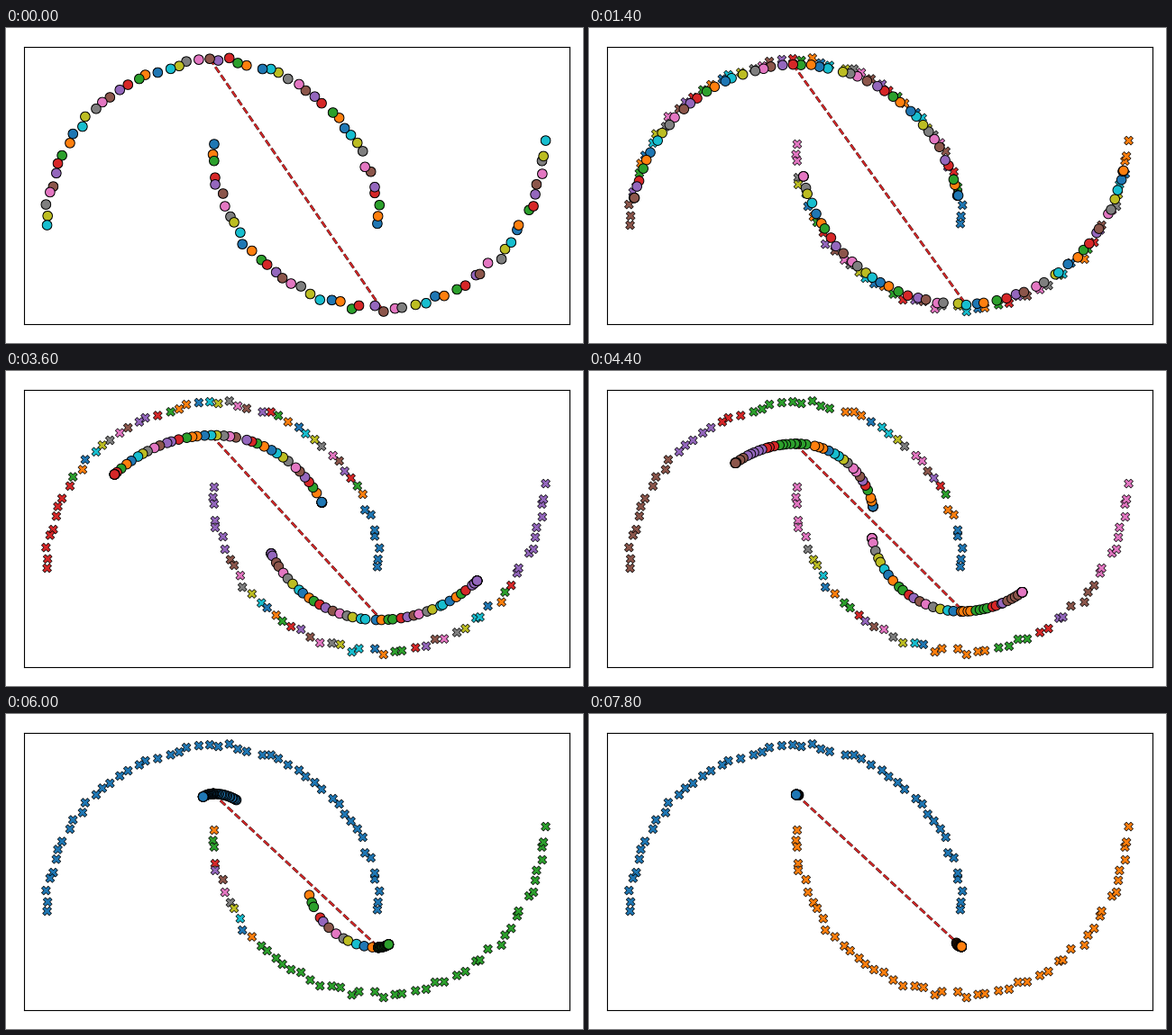
These frames come from a looping animation (640 px wide and 350 px high, 8 s). A matplotlib script:

```python
import numpy as np
import matplotlib.pyplot as plt
from matplotlib.animation import FuncAnimation

plt.rcParams["lines.scale_dashes"] = False
W, H, DPI = 640, 350, 100
STEP, FRAMES = 200, 40
N, R, NOISE = 50, 183.5, 2
TAB = np.array(plt.get_cmap("tab10").colors)
rng = np.random.default_rng(5)


def fade(k, span, power):
    """Ease from 1 down to 0 over about 'span' frames."""
    return np.exp(-(k / span) ** power)


class Moon:
    """Half circle of noisy points whose centres contract to one spot.

    The 'near' end lies beside the other moon and sags towards it,
    the 'far' end slides along the arc to the apex.
    """

    def __init__(self, sign, centre, reach, sag, still):
        self.sign, self.centre = sign, np.array(centre)
        self.reach, self.sag, self.still = reach, sag, still
        a = np.linspace(0, np.pi, N)
        spot = R * np.c_[np.cos(a), -np.sin(a)] + rng.normal(0, NOISE, (N, 2))
        self.data = self.centre + sign * spot
        # +1 at the near end, 0 at the apex, -1 at the far end
        self.lin = np.arctan2(spot[:, 0], -spot[:, 1]) * 2 / np.pi
        self.noise = self.data - self.arc(0)

    def half(self, k, lin, w, h, lo, hi):
        """Points on a circular arc from the apex to (w, h)."""
        f = np.clip((lin - lo) / (hi - lo), 0, 1)
        w, h = max(w, .02), max(h, .001)
        rad, turn = (w * w + h * h) / (2 * h), 2 * np.arctan2(h, w)
        return rad * np.c_[np.sin(f * turn), 1 - np.cos(f * turn)]

    def arc(self, k):
        w = R * self.reach(k)
        slope = np.interp(k, [0, 7, 12, 18, 22, 30],
                          [1, .81, .61, .62, .82, self.sag])
        hi = .6 + .4 * fade(k, 14.5, 2)
        near = self.half(k, self.lin, w, w * slope,
                         np.interp(k, [20, 30], [0, self.still]),
                         hi + np.interp(k, [15, 30], [0, .4]))
        far = self.half(k, -self.lin, R * fade(k, 22, 3.3),
                        R * fade(k, 15, 2), 0, hi) * [-1, 1]
        apex = [0, 53 * (1 - fade(k, 17.5, 2.6)) - R]
        shape = np.where(self.lin[:, None] > 0, near, far)
        return self.centre + self.sign * (apex + shape)

    def centres(self, k):
        return self.arc(k) + fade(k, 6, 2) * self.noise


def labels(u, k):
    """Number the groups; neighbours closer than a growing limit share one."""
    gap = np.hypot(*np.diff(u, axis=0).T)
    return np.r_[0, np.cumsum(gap >= min(k / 2, 5.5))]


upper = Moon(1, (230, 220), lambda k: fade(k, 24, 3), .28, .3)
lower = Moon(-1, (413, 128),
             lambda k: np.interp(k, [0, 6, 12, 20, 30, 39],
                                 [1, .97, .88, .57, .42, .03]), .78, .52)

fig = plt.figure(figsize=(W / DPI, H / DPI), dpi=DPI, facecolor="white")
ax = fig.add_axes([20 / W, 1 - 329 / H, 605 / W, 308 / H])
ax.set(xlim=(20, 625), ylim=(329, 21), xticks=[], yticks=[])

data = np.r_[upper.data, lower.data]
crosses = ax.scatter(*data.T, marker="X", s=50, edgecolors="black",
                     linewidths=.5, zorder=1)
links = [ax.plot([], [], color=c, lw=w, ls=(0, (5.5, 2.4)), zorder=2)[0]
         for c, w in (("black", 2), (TAB[3], 1.5))]
dots = ax.scatter(*data.T, s=58, edgecolors="black", linewidths=.7, zorder=3)


def draw(k):
    u, v = upper.centres(k), lower.centres(k)
    first = labels(u, k)
    colors = TAB[np.r_[first, labels(v, k) + first[-1] + 1] % 10]
    dots.set_offsets(np.r_[u, v])
    for marks in (dots, crosses):
        marks.set_facecolor(colors)
    for link in links:
        link.set_data(*zip(u[N // 2], v[N // 2]))
    return [crosses, *links, dots]


anim = FuncAnimation(fig, draw, frames=FRAMES, interval=STEP,
                     init_func=lambda: draw(0), repeat=True, repeat_delay=0)
plt.show()
```
